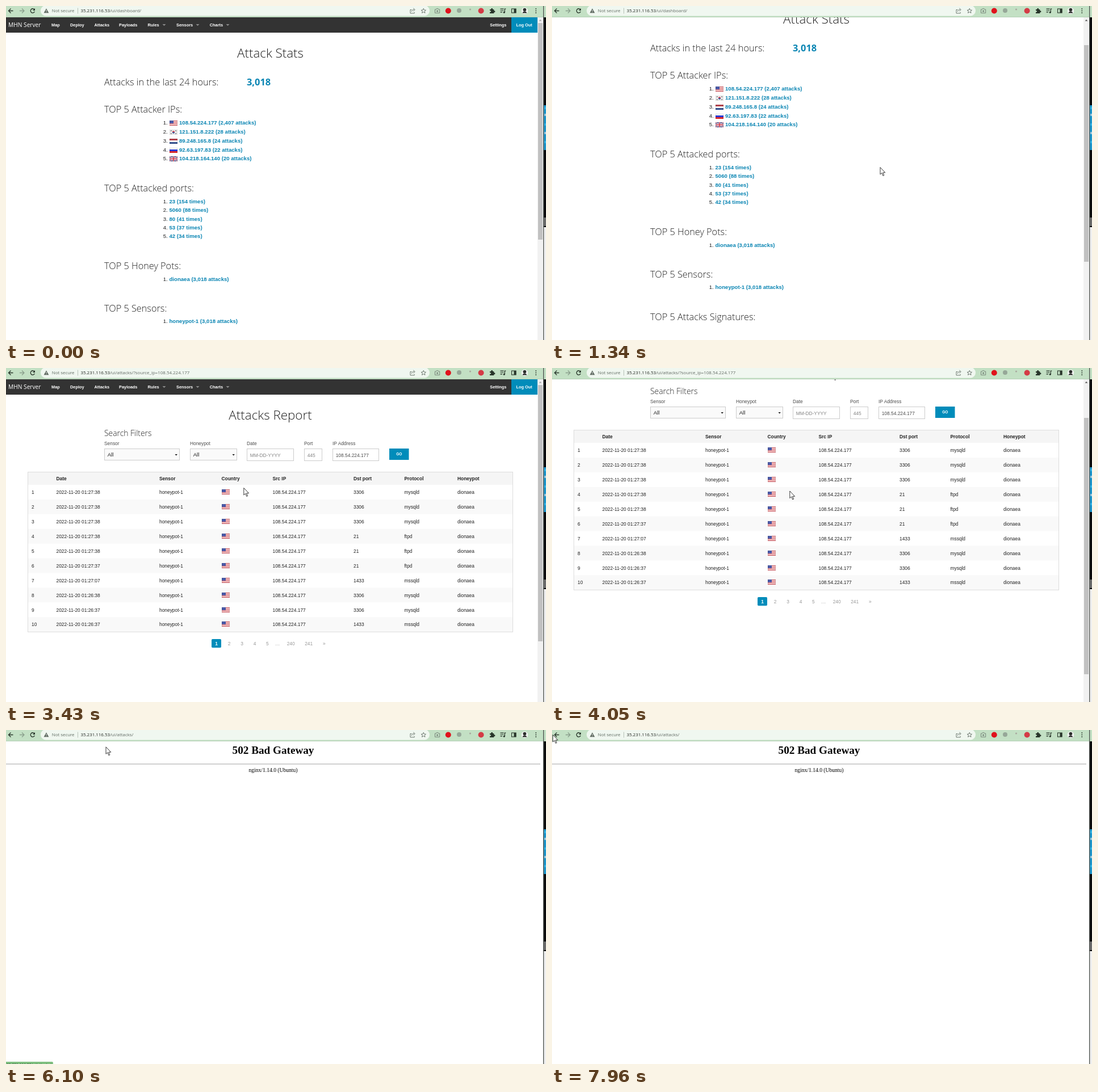
Recreate the animation shown at these times as an HTML page. Size 951 by 589 pixels, loop 8000 ms.

```html
<!DOCTYPE html>
<html lang="en">
<head>
<meta charset="utf-8">
<title>Attack dashboard</title>
<style>
html, body { margin: 0; width: 100%; height: 100%; overflow: hidden; background: #fff; }
svg { display: block; width: 951px; height: 589px; }
text { white-space: pre; }
.sans { font-family: "Liberation Sans", Arial, sans-serif; }
.open { font-family: "Open Sans", "Noto Sans", sans-serif; }
.serif { font-family: "Liberation Serif", Times, serif; }
.light { font-weight: 300; }
.bold { font-weight: 700; }
.mid { text-anchor: middle; }
.link { font-weight: 700; }
</style>
</head>
<body>
<svg id="stage" viewBox="0 0 951 589"></svg>
<script>
const BLUE = '#008cba', LINK = '#0a85b3', INK = '#222';
const IP = '108.54.224.177', HOST = '35.231.116.53';

const rect = (x, y, w, h, fill, more = '') =>
  `<rect x="${x}" y="${y}" width="${w}" height="${h}" fill="${fill}" ${more}/>`;
// Baselines sit on whole pixels, as in a browser page.
const text = (x, y, size, str, cls = 'sans', fill = INK, more = '') =>
  `<text x="${x}" y="${Math.round(y)}" font-size="${size}" class="${cls}" fill="${fill}" ${more}>${str}</text>`;
const path = (d, fill = 'none', stroke = 'none', w = 1, more = '') =>
  `<path d="${d}" fill="${fill}" stroke="${stroke}" stroke-width="${w}" ${more}/>`;
const disc = (x, y, r, fill) => `<circle cx="${x}" cy="${y}" r="${r}" fill="${fill}"/>`;
const group = (id, body, more = '') => `<g id="${id}" ${more}>${body}</g>`;
const bands = colors => colors.map((c, i) => rect(0, i * 9 / colors.length, 14, 9 / colors.length, c)).join('');

const FLAGS = {
  us: bands(['#d8545c', '#f3dcdc', '#d8545c', '#f3dcdc', '#d8545c', '#f3dcdc', '#d8545c']) + rect(0, 0, 7, 5, '#4a5aa8'),
  kr: rect(0, 0, 14, 9, '#f1f1f1') + path('M4.7 4.5a2.3 2.3 0 0 1 4.6 0z', '#cf2f3f') +
    path('M4.7 4.5a2.3 2.3 0 0 0 4.6 0z', '#27468f') +
    path('M2 2.8l1.6-1.3M10.4 1.5l1.6 1.3M2 6.2l1.6 1.3M10.4 7.5l1.6-1.3', 'none', '#555', 1.1),
  nl: bands(['#b5424c', '#f6f6f6', '#33508f']),
  ru: bands(['#f8f8f8', '#2438d8', '#e02828']),
  gb: rect(0, 0, 14, 9, '#34488f') + path('M0 0l14 9M14 0L0 9', 'none', '#e6e3ee', 2) +
    path('M0 0l14 9M14 0L0 9', 'none', '#cc4452', .7) +
    path('M7 0v9M0 4.5h14', 'none', '#f4f0f4', 3) + path('M7 0v9M0 4.5h14', 'none', '#cc3344', 1.6)
};
const flag = (kind, x, y) => `<g transform="translate(${x} ${Math.round(y)})">${FLAGS[kind]}` +
  rect(.25, .25, 13.5, 8.5, 'none', 'stroke="#000" stroke-opacity=".18" stroke-width=".5"') + '</g>';

function navBar() {
  const items = [[80, 'Map'], [113, 'Deploy'], [155.5, 'Attacks'], [199, 'Payloads'],
    [249.5, 'Rules'], [300, 'Sensors'], [358.7, 'Charts'], [852.3, 'Settings']];
  return rect(0, 20, 936, 27, '#333') + rect(890, 20, 46, 27, BLUE) +
    text(4, 37, 10.2, 'MHN Server', 'open', '#fff') +
    items.map(([x, s]) => text(x, 36, 7.4, s, 'sans bold', '#fff')).join('') +
    text(898.5, 36, 7.4, 'Log Out', 'sans bold', '#fff') +
    [278.5, 337.5, 390.5].map(x => path(`M${x - 3} 32h6l-3 3z`, '#8d8d8d')).join('');
}

const heading = (y, s) => text(173, y, 16.3, s, 'open light');
const title = s => text(465.5, 91, 22.4, s, 'open light mid');
const item = (i, y, s, country) => text(276.7, y, 9.6, `${i + 1}.`) +
  (country ? flag(country, 288, y - 7) : '') +
  text(country ? 305 : 287.5, y, 9.6, s, 'sans link', LINK, country === 'us' ? 'id="hot"' : '');

function dashboard() {
  const ips = [['us', IP + ' (2,407 attacks)'], ['kr', '121.151.8.222 (28 attacks)'], ['nl', '89.248.165.8 (24 attacks)'],
    ['ru', '92.63.197.83 (22 attacks)'], ['gb', '104.218.164.140 (20 attacks)']];
  const ports = ['23 (154', '5060 (88', '80 (41', '53 (37', '42 (34'];
  return navBar() + title('Attack Stats') +
    heading(140, 'Attacks in the last 24 hours:') + text(424, 140, 16.4, '3,018', 'open link', LINK) +
    heading(188, 'TOP 5 Attacker IPs:') +
    ips.map(([c, s], i) => item(i, 209 + 15.85 * i, s, c)).join('') +
    heading(327, 'TOP 5 Attacked ports:') +
    ports.map((s, i) => item(i, 348 + 15.36 * i, s + ' times)')).join('') +
    heading(464, 'TOP 5 Honey Pots:') + item(0, 485, 'dionaea (3,018 attacks)') +
    heading(539, 'TOP 5 Sensors:') + item(0, 559, 'honeypot-1 (3,018 attacks)') +
    heading(614, 'TOP 5 Attacks Signatures:');
}

function filters() {
  const field = (x, w, label, value, color, select) =>
    text(x, 136, 8.4, label, 'sans', '#4d4d4d') +
    rect(x + .5, 142.5, w - 1, select ? 20 : 21, select ? '#fafafa' : '#fff', 'stroke="#ccc"') +
    text(x + 5.7, select ? 156 : 157, select ? 9.6 : 8.4, value, 'sans', color) +
    (select ? path(`M${x + w - 8.5} 152h4.4l-2.2 2.6z`, '#111') : '');
  return text(173, 120, 13.9, 'Search Filters', 'open light') +
    field(173, 133, 'Sensor', 'All', INK, true) + field(324, 83, 'Honeypot', 'All', INK, true) +
    field(424, 83, 'Date', 'MM-DD-YYYY', '#858585') + field(525, 32, 'Port', '445', '#858585') +
    field(575, 82, 'IP Address', IP, '#4d4d4d') +
    rect(675, 142, 34.5, 20, BLUE) + text(692.3, 154, 6.6, 'GO', 'sans bold mid', '#fff');
}

function attackTable() {
  const cols = [45, 88.5, 270, 379.5, 469.5, 612, 701.5, 795];
  const heads = ['', 'Date', 'Sensor', 'Country', 'Src IP', 'Dst port', 'Protocol', 'Honeypot'];
  const times = '27:38 27:38 27:38 27:38 27:38 27:37 27:07 26:38 26:37 26:37'.split(' ');
  const kinds = 'mysqld mysqld mysqld ftpd ftpd ftpd mssqld mysqld mysqld mssqld'.split(' ');
  const ports = { mysqld: 3306, ftpd: 21, mssqld: 1433 };
  const rows = times.map((time, i) => {
    const y = 206 + 25.92 * i;
    const cells = [i + 1, '2022-11-20 01:' + time, 'honeypot-1', '', IP, ports[kinds[i]], kinds[i], 'dionaea'];
    return (i % 2 ? rect(39, y, 853, 25.92, '#f9f9f9') : '') + flag('us', 380, y + 8.2) +
      cells.map((s, c) => text(cols[c], y + 16.2, 8.4, s)).join('');
  });
  return rect(39, 184, 853, 22, '#f5f5f5') + rows.join('') +
    heads.map((s, c) => text(cols[c], 198, 8.4, s, 'sans bold')).join('') +
    rect(38.5, 183.5, 854, 282, 'none', 'stroke="#ddd"');
}

function pager() {
  const pages = [[393, 2], [415.5, 3], [438, 4], [460.3, 5], [478.3, '…'], [501.7, 240], [533.2, 241], [560.3, '»']];
  return rect(362, 478, 17, 15.2, BLUE, 'rx="1.8"') + text(370.5, 489, 8.4, 1, 'sans bold mid', '#fff') +
    pages.map(([x, s]) => text(x, 489, 8.4, s, 'sans mid', '#999')).join('');
}

const attacks = () => navBar() + title('Attacks Report') + filters() + attackTable() + pager();

const gateway = () => text(470.5, 42, 19.2, '502 Bad Gateway', 'serif bold mid', '#000') +
  rect(0, 59.5, 941, 1, '#a2a2a2') + text(470.5, 74, 9.6, 'nginx/1.14.0 (Ubuntu)', 'serif mid', '#000');

function toolbar() {
  const dark = '#28352a', grey = '#5f6a61';
  const address = (id, s) => group(id,
    text(131.5, 11, 7.9, `${HOST}<tspan fill="#626a64">${s}</tspan>`, 'open', '#20251f'));
  const arrow = (x, dir, c) => path(`M${x - 4 * dir} 8.5h${8 * dir}M${x} 4.5l${4 * dir} 4l${-4 * dir} 4`, 'none', c, 1.3);
  return rect(0, 0, 951, 20, '#c3e0c4') + rect(0, 19, 946, 1, '#b5d0b6') +
    rect(61, -1, 685, 18.5, '#f0f7f0', 'rx="9.2"') +
    arrow(8.5, -1, dark) + arrow(28, 1, '#8a9f8c') +
    group('reload', path('M49.9 6.2A3.7 3.7 0 1 0 50.4 9.8', 'none', dark, 1.3) + path('M51 4v4h-4z', dark)) +
    group('stop', path('M43.5 5l7 7M50.5 5l-7 7', 'none', dark, 1.3)) +
    path('M71 4.3l4.4 8h-8.8z', grey) + rect(70.6, 7, .9, 2.6, '#fff') + rect(70.6, 10.4, .9, .9, '#fff') +
    text(80.7, 11, 7.9, 'Not secure', 'open', grey) + rect(126, 3.5, .8, 10, '#aab5ab') +
    address('urlDash', '/ui/dashboard/') + address('urlAttacks', '/ui/attacks/?source_ip=' + IP) + address('urlError', '/ui/attacks/') +
    path('M714.5 6.5H712v6.3h7.2v-2M714.3 10c.4-2.5 2-3.6 4.2-3.6M717.3 4l3 2.5-3 2.6', 'none', grey, .9) +
    path('M735.3 4.3l1.2 2.8 3 .2-2.3 2 .8 3-2.7-1.7-2.7 1.7.8-3-2.3-2 3-.2z', 'none', grey, .9) +
    path('M755.5 6h2l.8-1.3h2.6l.8 1.3h2v6.3h-8.2z', 'none', '#78857a', 1) + disc(759.6, 9, 1.5, '#78857a') +
    disc(778.8, 8.5, 5, '#e0121c') + disc(798, 8, 4, '#96a798') + disc(817.5, 6, 1.6, '#a9a99f') + disc(836.6, 8.5, 5, '#d43b46') +
    path('M852 6h2.3a1.5 1.5 0 1 1 2.8 0h2.2v2.3a1.5 1.5 0 1 1 0 2.7v2H852v-2.3a1.4 1.4 0 1 0 0-2.5z', dark) +
    path('M870.5 5.2h6M870.5 8h6M870.5 10.8h3.5M878.3 11V5.2h2', 'none', dark, 1.2) + disc(877.2, 11.2, 1.5, dark) +
    rect(890.5, 5, 7.6, 7, 'none', `stroke="${dark}" stroke-width="1.1"`) + rect(894.5, 5, 3.6, 7, dark) +
    disc(913.4, 8.5, 5.7, '#f4f6f4') + disc(913.4, 6.6, 2.9, '#2c2e2c') + path('M909.8 12.6a3.6 3 0 0 1 7.2 0z', '#2c2e2c') +
    [5, 8.5, 12].map(y => disc(933.3, y, .9, dark)).join('');
}

const edge = () => rect(945, 20, 1, 569, '#fbfbfb') + rect(947, 20, 4, 370, '#0b0b0c') + rect(947, 175, 4, 79, '#1f97cb') +
  [178, 190, 207, 222, 238].map((y, i) => rect(948, y, 3, 4, i % 2 ? '#9cc8de' : '#35b4e4')).join('') +
  rect(947, 373, 4, 15, '#6d6d6d') + rect(947, 391, 4, 198, '#efefef') + rect(946, 0, 1.3, 589, '#4c514d');

const statusBar = (id, w, s) => group(id, path(`M0 585h${w - 2}q2 0 2 2v2H0z`, '#7fbf80') + text(1, 593, 6.7, s, 'open', '#24402a'));

document.getElementById('stage').innerHTML =
  '<clipPath id="view"><rect y="20" width="946" height="569"/></clipPath>' +
  rect(0, 0, 951, 589, '#fff') +
  `<g clip-path="url(#view)">${group('dash', dashboard())}${group('report', attacks())}${group('error', gateway())}` +
  group('bar', rect(936, 20, 9.5, 569, '#f1f1f1') + path('M938.7 26.5h4.6l-2.3-2.8z', '#a3a3a3', 'none', 1, 'id="up"') +
    rect(937, 30, 8, 382, '#c1c1c1', 'id="thumb"')) + '</g>' +
  toolbar() + edge() +
  statusBar('statusLink', 168, `${HOST}/ui/attacks/?source_ip=${IP}`) + statusBar('statusNav', 83, HOST + '/ui/attacks/') +
  group('cursor', path('M.5 .5V13l2.9-2.6 2 5 1.9-.8-2-4.8h4z', '#fff', '#222', .9, 'stroke-linejoin="round"'));

// Times in ms: scroll values are held, cursor points are eased between.
const SCROLL = [[0, 0], [110, 12], [160, 40], [220, 60], [320, 82], [380, 112], [430, 120], [520, 150], [580, 176],
  [640, 190], [720, 220], [790, 240], [880, 250], [1030, 228], [1100, 190], [1180, 140], [1260, 96], [1340, 60], [1390, 0],
  [3480, 16], [3540, 52], [3600, 84], [3660, 112], [3750, 134], [4050, 74], [4100, 24], [4200, 0]];
const CURSOR = [[1740, 577.5, 284], [2360, 427, 206.5], [2980, 427, 206.5], [3430, 418.3, 211], [3750, 418.3, 214],
  [3850, 418.3, 216.5], [4410, 418.3, 216.5], [5180, 139, 49], [5330, 127.3, 32], [5430, 127.3, 32], [5630, 173.5, 29.5],
  [5850, 173.5, 29.5], [5900, 175.5, 29.3], [6810, 175.5, 29.3], [7550, 1, 9], [7910, 1, 9], [7960, 1, 8]];

const held = (keys, t) => keys.filter(k => k[0] <= t).pop()[1];
function eased(keys, t) {
  const i = keys.findIndex(k => k[0] > t);
  if (i < 0) return keys[keys.length - 1].slice(1);
  if (i === 0) return keys[0].slice(1);
  const [a, b] = [keys[i - 1], keys[i]];
  const u = (t - a[0]) / (b[0] - a[0]), k = u * u * (3 - 2 * u);
  return [a[1] + (b[1] - a[1]) * k, a[2] + (b[2] - a[2]) * k];
}

const $ = id => document.getElementById(id);
const show = (id, on) => $(id).setAttribute('visibility', on ? 'visible' : 'hidden');
const within = (t, a, b) => t >= a && t < b;

function draw(t) {
  const page = t < 2770 ? 0 : t < 5950 ? 1 : 2;
  ['dash', 'report', 'error'].forEach((id, i) => show(id, i === page));
  ['urlDash', 'urlAttacks', 'urlError'].forEach((id, i) => show(id, i === page));

  const y = held(SCROLL, t), ratio = page ? .784 : .65;
  $('dash').setAttribute('transform', `translate(0 ${-y})`);
  $('report').setAttribute('transform', `translate(0 ${-y})`);
  show('bar', page < 2);
  $('thumb').setAttribute('y', 30 + y * ratio);
  $('thumb').setAttribute('height', page ? 452 : 382);
  $('up').setAttribute('fill', y ? '#505050' : '#a3a3a3');

  const loading = within(t, 2560, 2820) || within(t, 5850, 6100);
  show('stop', loading);
  show('reload', !loading);
  $('hot').setAttribute('fill', within(t, 2300, 2770) ? '#06617f' : LINK);
  show('statusLink', within(t, 2510, 2980));
  show('statusNav', within(t, 5530, 6510));
  $('statusNav').setAttribute('opacity', t < 6360 ? 1 : Math.max(0, 1 - (t - 6310) / 200));

  show('cursor', t >= 110);
  $('cursor').setAttribute('transform', `translate(${eased(CURSOR, t).join(' ')})`);
}

const start = performance.now();
function tick() {
  draw((performance.now() - start) % 8000);
  requestAnimationFrame(tick);
}
tick();
</script>
</body>
</html>
```
